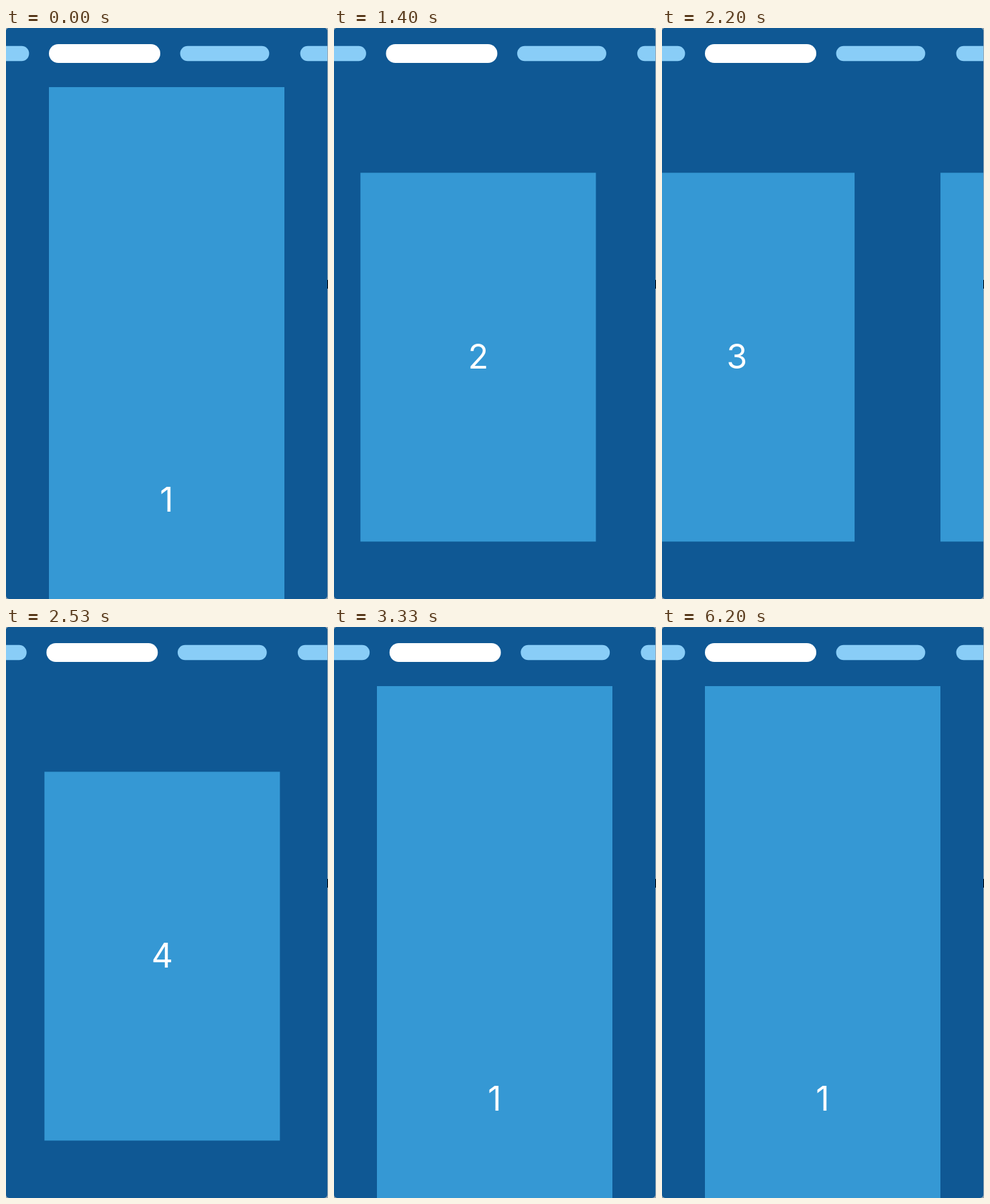
These frames come from a looping animation (480 by 850 pixels, 6270 ms). An HTML page:

```html
<!DOCTYPE html>
<html lang="en">
<head>
<meta charset="utf-8">
<title>Paged cards</title>
<style>
  html, body { margin: 0; width: 100%; height: 100%; overflow: hidden; background: #98a6b0; }
  svg { display: block; width: 480px; height: 850px; }
  text { font: 400 50px Inter, Roboto, "Liberation Sans", sans-serif; fill: #fff; text-anchor: middle; }
</style>
</head>
<body>
<svg viewBox="0 0 480 850">
  <defs>
    <clipPath id="screen"><rect width="479" height="850" rx="5"/></clipPath>
  </defs>
  <g clip-path="url(#screen)">
    <rect width="480" height="850" fill="#0f5894"/>
    <g id="cards"></g>
    <rect width="480" height="88" fill="#0f5894"/>
    <rect id="shadow" y="88" width="480" height="11" fill="#000"/>
    <g id="tabs"></g>
  </g>
  <rect x="479" y="375" width="1" height="13" fill="#000"/>
</svg>
<script>
const LOOP = 6270, PAGE_W = 479, PAGES = 4;
const TAB_GAP = 179, TAB_X = 147, TAB_Y = 38, TAB_MS = 305;
const SCROLL_Y = 467, SCROLL_MS = 680, SCROLL_UP = 3840, SCROLL_BACK = 4620;

// One swipe per page; the tabs follow as soon as a swipe has settled
const swipes = [
  { start: 535, ms: 615 },
  { start: 1335, ms: 500 },
  { start: 2063, ms: 440 },
  { start: 2490, ms: 600 }
];

const clamp = v => Math.min(1, Math.max(0, v));
const mix = (a, b, k) => a + (b - a) * k;
const progress = (t, start, ms) => clamp((t - start) / ms);
const flick = u => 1 - (1 - u * u) ** 3;
const sine = u => (1 - Math.cos(Math.PI * u)) / 2;
const sum = (list, fn) => list.reduce((total, item) => total + fn(item), 0);

const pageAt = t => sum(swipes, s => flick(progress(t, s.start, s.ms)));
const tabAt = t => sum(swipes, s => sine(progress(t, s.start + s.ms, TAB_MS)));
const scrollAt = t => SCROLL_Y *
  (flick(progress(t, SCROLL_UP, SCROLL_MS)) - flick(progress(t, SCROLL_BACK, SCROLL_MS)));

function add(parent, tag, attrs) {
  const el = document.createElementNS("http://www.w3.org/2000/svg", tag);
  for (const name in attrs) el.setAttribute(name, attrs[name]);
  return parent.appendChild(el);
}

const byId = id => document.getElementById(id);

const cards = Array.from({ length: PAGES + 1 }, (_, i) => {
  const tall = i % PAGES === 0;
  const y = tall ? 88 : 215.5, height = tall ? 1230 : 549;
  const el = add(byId("cards"), "g", {});
  add(el, "rect", { x: 64, y, width: 351, height, fill: "#3598d4" });
  add(el, "text", { x: 239.5, y: y + height / 2 + 16.8 }).textContent = i % PAGES + 1;
  return { el, tall };
});

const tabs = Array.from({ length: PAGES + 4 }, (_, i) => ({
  index: i - 1,
  el: add(byId("tabs"), "rect", { x: -83, y: -14, width: 166, height: 28, rx: 14 })
}));

function draw(t) {
  const page = pageAt(t), y = scrollAt(t), tab = tabAt(t);

  cards.forEach(({ el, tall }, i) =>
    el.setAttribute("transform", `translate(${(i - page) * PAGE_W} ${tall ? -y : 0})`));

  tabs.forEach(({ el, index }) => {
    const d = index - tab;
    const on = clamp((.8 - Math.abs(d)) / .6);
    const color = [137, 205, 247].map(c => Math.round(mix(c, 255, on)));
    el.setAttribute("transform",
      `translate(${TAB_X + d * TAB_GAP} ${TAB_Y}) scale(${mix(.8, 1, on)})`);
    el.setAttribute("fill", `rgb(${color})`);
  });

  byId("shadow").setAttribute("opacity", .25 * clamp(y / 60));
}

const begin = performance.now();
function tick() {
  draw((performance.now() - begin) % LOOP);
  requestAnimationFrame(tick);
}
tick();
</script>
</body>
</html>
```
